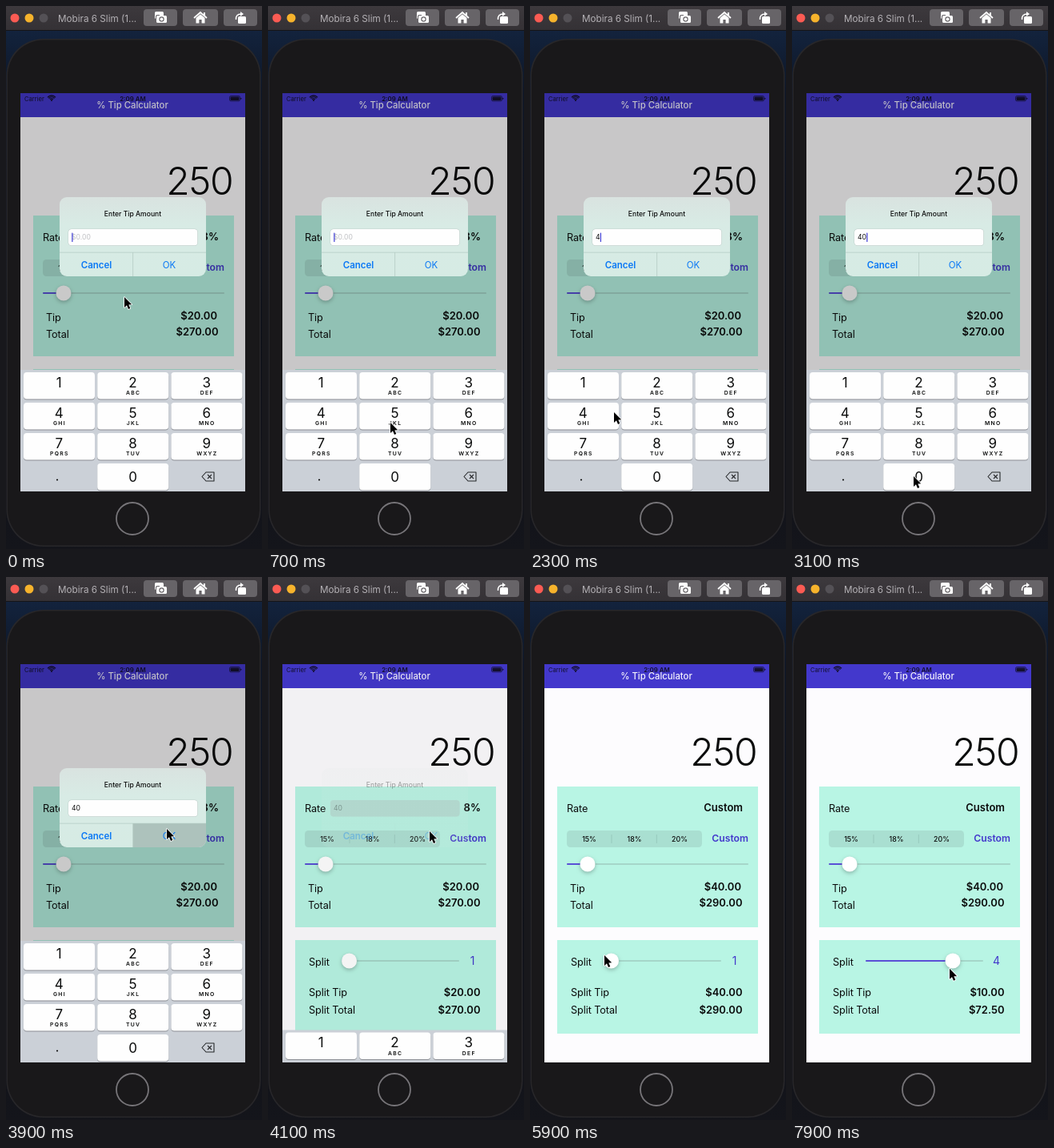
Animation of 320 by 679 pixels, one loop 8000 ms. Source, as an HTML page with a canvas:

```html
<!DOCTYPE html>
<html lang="en">
<head>
<meta charset="utf-8">
<title>Tip Calculator</title>
<style>
html, body { margin: 0; width: 100%; height: 100%; overflow: hidden; background: #0e1118; }
canvas { display: block; width: 320px; height: 679px; }
</style>
</head>
<body>
<canvas id="stage"></canvas>
<script>
const W = 320, H = 679, LOOP = 8000;
const canvas = document.getElementById('stage');
const c = canvas.getContext('2d');
const dpr = window.devicePixelRatio || 1;
canvas.width = W * dpr;
canvas.height = H * dpr;

const PURPLE = '#4338cc', MINT = '#b8f5e4', BLUE = '#0a78f5', INK = '#0b0c0c';
const TYPE_4 = 2000, TYPE_0 = 3000, PRESS_OK = 3800, CLOSE = 3960, APPLY = 4300;
const GRAB = 6100, DROP = 7600;

// time, x, y of the pointer tip
const PATH = [
  [0, 148, 364], [700, 153, 521], [1400, 105, 508], [2350, 105, 508],
  [2850, 152, 588], [3200, 152, 588], [3700, 201, 315], [3950, 201, 315],
  [4100, 202, 318], [4700, 202, 320], [5700, 93, 473], [GRAB, 93, 473],
  [DROP, 197, 489], [LOOP, 197, 490]
];

const clamp = v => Math.max(0, Math.min(1, v));
const lerp = (a, b, p) => a + (b - a) * p;
const smooth = p => p * p * (3 - 2 * p);
const easeOut = p => 1 - (1 - p) ** 3;
const money = v => '$' + v.toFixed(2);

function box(x, y, w, h, r, fill) {
  c.beginPath();
  c.roundRect(x, y, w, h, r);
  c.fillStyle = fill;
  c.fill();
}

function disc(x, y, r, fill) {
  c.beginPath();
  c.arc(x, y, r, 0, Math.PI * 2);
  c.fillStyle = fill;
  c.fill();
}

function line(points, color, width) {
  c.beginPath();
  points.forEach(([x, y]) => c.lineTo(x, y));
  c.strokeStyle = color;
  c.lineWidth = width;
  c.stroke();
}

function text(str, x, y, size, { weight = 400, color = INK, align = 'left', track = 0 } = {}) {
  c.font = `${weight} ${size}px Inter, "Liberation Sans", sans-serif`;
  c.letterSpacing = track + 'px';
  c.textAlign = align;
  c.fillStyle = color;
  c.fillText(str, x, y);
  c.letterSpacing = '0px';
}

const label = (str, x, y) => text(str, x, y, 12.7, { track: -0.1 });
const amount = (str, x, y) => text(str, x, y, 13, { weight: 600, align: 'right' });

function pointerAt(t) {
  let i = 0;
  while (i < PATH.length - 2 && t >= PATH[i + 1][0]) i++;
  const [t0, x0, y0] = PATH[i], [t1, x1, y1] = PATH[i + 1];
  const p = smooth(clamp((t - t0) / (t1 - t0)));
  return [lerp(x0, x1, p), lerp(y0, y1, p)];
}

function drawWindow() {
  const sky = c.createLinearGradient(0, 31, 0, H);
  sky.addColorStop(0, '#13233d');
  sky.addColorStop(0.12, '#0d1626');
  sky.addColorStop(0.6, '#0b0e17');
  sky.addColorStop(1, '#14151b');
  box(0, 31, W, H - 31, 0, sky);

  const bar = c.createLinearGradient(0, 0, 0, 31);
  bar.addColorStop(0, '#3d393d');
  bar.addColorStop(1, '#343135');
  box(0, 0, W, 31, 0, bar);
  box(0, 30, W, 1, 0, '#151417');
  disc(11, 15, 5.5, '#fb5b53');
  disc(29, 15, 5.5, '#f6b32c');
  disc(47, 15, 5.5, '#545156');
  text('Mobira 6 Slim (1...', 65, 19.5, 11.7, { color: '#b4b1b5' });

  for (const x of [172, 221, 272]) box(x, 4, x === 221 ? 44 : 42, 21, 4, '#676468');
  drawCamera(193, 15);
  drawHome(243, 15);
  drawRotate(293, 15);
}

function drawCamera(x, y) {
  box(x - 7, y - 8, 11, 9, 1.5, '#fff');
  box(x - 6, y - 4, 14, 10, 2, '#676468');
  box(x - 5, y - 3, 13, 9, 1.5, '#fff');
  box(x - 1, y - 5, 5, 3, 1, '#fff');
  disc(x + 1.5, y + 1.5, 3.2, '#676468');
  disc(x + 1.5, y + 1.5, 2, '#fff');
}

function drawHome(x, y) {
  line([[x - 8, y], [x, y - 7], [x + 8, y]], '#fff', 1.8);
  c.beginPath();
  [[-5.5, 0], [0, -4.8], [5.5, 0], [5.5, 6.5], [1.6, 6.5], [1.6, 2], [-1.6, 2], [-1.6, 6.5], [-5.5, 6.5]]
    .forEach(([dx, dy]) => c.lineTo(x + dx, y + dy));
  c.fillStyle = '#fff';
  c.fill();
  box(x + 4, y - 7, 2, 5, 0, '#fff');
}

function drawRotate(x, y) {
  box(x - 3, y - 2, 10, 9, 1.5, '#fff');
  c.beginPath();
  c.moveTo(x - 5.5, y + 2);
  c.quadraticCurveTo(x - 6, y - 5, x + 1, y - 5);
  c.strokeStyle = '#fff';
  c.lineWidth = 1.5;
  c.stroke();
  c.beginPath();
  c.moveTo(x, y - 8);
  c.lineTo(x + 4, y - 5);
  c.lineTo(x, y - 2);
  c.fillStyle = '#fff';
  c.fill();
}

function drawPhone() {
  box(0.5, 41, 318, 635, 46, '#28272a');
  box(2, 42.5, 315, 632, 45, '#19181a');
  c.beginPath();
  c.arc(158, 641, 20, 0, Math.PI * 2);
  c.strokeStyle = '#777579';
  c.lineWidth = 1.8;
  c.stroke();
}

function drawStatus() {
  const dark = '#14102f';
  text('Carrier', 23, 118.8, 7.6, { color: dark });
  c.strokeStyle = dark;
  c.lineWidth = 1.3;
  for (const r of [2.6, 4.7, 6.6]) {
    c.beginPath();
    c.arc(57, 118.6, r, -Math.PI * 0.77, -Math.PI * 0.23);
    c.stroke();
  }
  disc(57, 118, 1.1, dark);
  text('2:09 AM', 158.5, 118.8, 7.9, { weight: 600, color: dark, align: 'center' });
  c.beginPath();
  c.roundRect(279.5, 112.5, 13, 6.4, 1.8);
  c.lineWidth = 0.7;
  c.stroke();
  box(280.5, 113.5, 11, 4.4, 1, dark);
  box(293.3, 114.7, 1, 2, 0.5, dark);
}

function slider(x0, x1, y, thumb) {
  box(x0, y - 1, x1 - x0, 2, 1, '#a5d6c9');
  box(x0, y - 1, thumb - x0, 2, 1, '#5a50d6');
  c.save();
  c.shadowColor = 'rgba(0,0,0,.25)';
  c.shadowBlur = 5 * dpr;
  c.shadowOffsetY = 2 * dpr;
  disc(thumb, y, 9.5, '#fff');
  c.restore();
}

function drawApp(t) {
  const custom = t >= APPLY;
  const tip = custom ? 40 : 20, total = 250 + tip;
  const drag = smooth(clamp((t - GRAB) / (DROP - GRAB)));
  const thumb = lerp(101.5, 201, drag);
  const people = Math.floor(1 + 4 * (thumb - 101.5) / 129);

  box(18, 109, 281, 498, 0, '#fdfcfe');
  box(18, 109, 281, 30, 0, PURPLE);
  drawStatus();
  text('% Tip Calculator', 158, 128, 11.3, { weight: 500, color: '#f4f2fd', align: 'center' });
  text('250', 283.5, 236, 48, { weight: 300, align: 'right', track: -1.2 });

  box(34, 262, 251, 176, 0, MINT);
  label('Rate', 46, 294);
  amount(custom ? 'Custom' : '8%', 266, 293);
  box(46, 317, 169, 21, 4.5, '#a9dfd1');
  ['15%', '18%', '20%'].forEach((s, i) =>
    text(s, 74 + i * 56.5, 331, 8.8, { weight: 500, align: 'center' }));
  for (const x of [101.5, 157.8]) box(x, 322, 1, 11, 0, '#97cabd');
  text('Custom', 273, 331, 12.2, { weight: 600, color: PURPLE, align: 'right' });
  slider(46, 273, 359, 72);
  label('Tip', 50, 393.5);
  label('Total', 50, 415);
  amount(money(tip), 264, 392);
  amount(money(total), 265.5, 412);

  box(34, 454, 251, 117, 0, MINT);
  label('Split', 51, 485.5);
  slider(92, 239, 480, thumb);
  text(String(people), 255.5, 484.5, 14, { color: PURPLE, align: 'center' });
  label('Split Tip', 51, 523.5);
  label('Split Total', 51, 545.5);
  amount(money(tip / people), 265.5, 523.5);
  amount(money(total / people), 265.5, 546);
}

function caretOn(t) {
  const since = t >= TYPE_0 ? t - TYPE_0 : t >= TYPE_4 ? t - TYPE_4 : t + 350;
  return since % 1000 < 500;
}

function drawAlert(t) {
  const entry = t >= TYPE_0 ? '40' : t >= TYPE_4 ? '4' : '';
  const left = 1 - clamp((t - CLOSE) / 330);
  const inkAlpha = left ** 2, glassAlpha = left ** 4;
  const glass = c.createLinearGradient(0, 239, 0, 338);
  glass.addColorStop(0, '#d9e3e0');
  glass.addColorStop(0.35, '#d8ebe5');
  glass.addColorStop(1, '#d6ebe4');

  c.save();
  c.globalAlpha = glassAlpha;
  box(67, 239, 183, 99, 9, glass);
  if (t >= PRESS_OK && t < CLOSE + 40) box(159, 308, 91, 30, [0, 0, 9, 0], '#adc2bc');
  box(67, 307.7, 183, 0.8, 0, '#b4cbc4');
  box(158.3, 308, 0.8, 30, 0, '#b4cbc4');
  box(77.5, 278.5, 162.5, 21.5, 4.5, '#c2d2cd');

  // the white of the field fades sooner than its grey base
  c.globalAlpha = inkAlpha;
  box(78, 279, 161.5, 20.5, 4, '#8ba8a0');
  c.globalAlpha = glassAlpha;
  box(78, 279, 161.5, 20.5, 4, '#fefefe');

  c.globalAlpha = inkAlpha;
  text('Enter Tip Amount', 158.5, 262.8, 8.6, { weight: 500, align: 'center' });
  text(entry || '$0.00', 82, 292.3, 8.6, { color: entry ? INK : '#bfc0c3' });
  if (t < CLOSE && caretOn(t)) {
    const w = entry ? c.measureText(entry).width : 0;
    box(82.2 + w, 283.5, 1.3, 11.5, 0.6, '#4a49d8');
  }
  text('Cancel', 113, 327.5, 11.5, { weight: 600, color: BLUE, align: 'center' });
  text('OK', 204, 327.5, 11.5, { color: BLUE, align: 'center' });
  c.restore();
}

function drawKeyboard(t) {
  const letters = ['', 'ABC', 'DEF', 'GHI', 'JKL', 'MNO', 'PQRS', 'TUV', 'WXYZ'];
  const key = (col, row, main, sub) => {
    const x = 22 + col * 92.2, y = 458 + row * 38;
    box(x, y + 1, 89, 33.5, 4, '#8b8e94');
    box(x, y, 89, 33.5, 4, '#fefefe');
    const mid = x + 44.3;
    text(main, mid, y + (row < 3 ? 18.5 : 23), 17, { align: 'center' });
    if (sub) text(sub, mid + 0.6, y + 28.3, 6.8, { weight: 600, align: 'center', track: 1.3 });
  };
  c.save();
  c.translate(0, 153 * easeOut(clamp((t - CLOSE) / 400)));
  box(18, 455, 281, 153, 0, '#cbd0d7');
  letters.forEach((sub, i) => key(i % 3, Math.floor(i / 3), String(i + 1), sub));
  key(1, 3, '0');
  disc(64, 592.5, 1.1, INK);

  c.beginPath();
  [[245, 588.5], [250, 583], [260, 583], [260, 594], [250, 594]].forEach(([x, y]) => c.lineTo(x, y));
  c.closePath();
  c.strokeStyle = '#26282b';
  c.lineWidth = 1.1;
  c.lineJoin = 'round';
  c.stroke();
  line([[252, 586], [257, 591]], '#26282b', 1.1);
  line([[257, 586], [252, 591]], '#26282b', 1.1);
  c.restore();
}

function drawPointer(t) {
  const [x, y] = pointerAt(t);
  c.save();
  c.translate(x, y);
  c.beginPath();
  [[0, 0], [0, 13], [3, 10.3], [5, 15], [7.3, 14], [5.3, 9.5], [9.2, 9.3]]
    .forEach(([dx, dy]) => c.lineTo(dx, dy));
  c.closePath();
  c.lineJoin = 'round';
  c.strokeStyle = '#fff';
  c.lineWidth = 1.6;
  c.stroke();
  c.fillStyle = '#000';
  c.fill();
  c.restore();
}

function draw(t) {
  c.setTransform(dpr, 0, 0, dpr, 0, 0);
  drawWindow();
  drawPhone();
  c.save();
  c.beginPath();
  c.rect(18, 109, 281, 498);
  c.clip();
  drawApp(t);
  const dim = 0.21 * (1 - easeOut(clamp((t - CLOSE) / 350)));
  box(18, 109, 281, 498, 0, `rgba(0,0,0,${dim})`);
  drawAlert(t);
  drawKeyboard(t);
  c.restore();
  drawPointer(t);
}

const start = performance.now();
function tick() {
  draw((performance.now() - start) % LOOP);
  requestAnimationFrame(tick);
}
tick();
</script>
</body>
</html>
```
